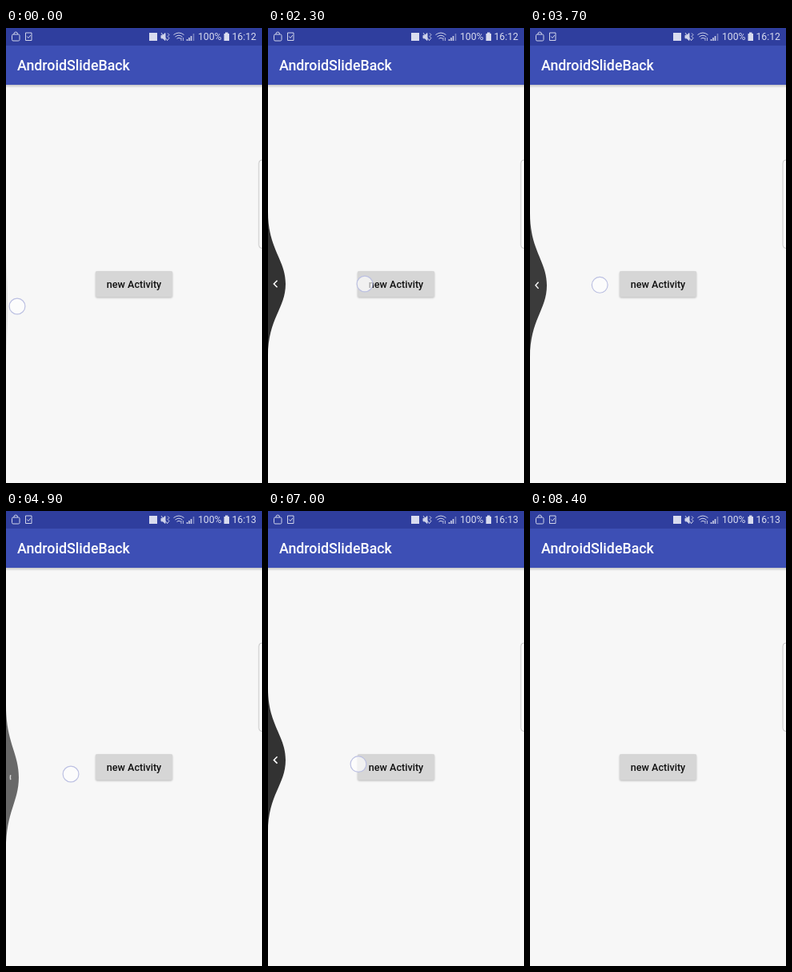
Write an HTML page that moves like this. It is 320x569 px and loops after 8500 ms.

```html
<!DOCTYPE html>
<html lang="en">
<head>
<meta charset="utf-8">
<title>Slide back</title>
<style>
  html, body { margin: 0; width: 100%; height: 100%; overflow: hidden; background: #f7f7f7; }
  svg { display: block; width: 100%; height: 100%; }
  text { font-family: Roboto, "Noto Sans", sans-serif; }
  .icon { fill: none; stroke: #d0d4ea; stroke-width: 1; }
  .status { fill: #d9dcef; font-size: 12.2px; }
</style>
</head>
<body>
<svg viewBox="0 0 320 569">
  <defs>
    <linearGradient id="shade" x2="0" y2="1">
      <stop offset="0" stop-color="#000" stop-opacity=".2"/>
      <stop offset="1" stop-color="#000" stop-opacity="0"/>
    </linearGradient>
    <filter id="soft" x="-10%" y="-20%" width="120%" height="150%">
      <feGaussianBlur stdDeviation="1"/>
    </filter>
  </defs>

  <rect width="320" height="569" fill="#f7f7f7"/>
  <rect y="71" width="320" height="4" fill="url(#shade)"/>
  <rect y="21" width="320" height="50" fill="#3d4fb5"/>
  <rect width="320" height="22" fill="#2f3e9e"/>
  <text x="14" y="53" font-size="17.8" font-weight="500" fill="#fff">AndroidSlideBack</text>

  <!-- status bar -->
  <g class="icon">
    <rect x="7.5" y="8" width="9.5" height="8" rx="1.5"/>
    <path d="M9.8 8q0-3 2.4-3t2.4 3"/>
    <path d="M24.5 6h7.5v9.5h-7.5zM26.3 10.5l1.7 2 2.8-3.5"/>
    <path d="M194 9.2h2l3-2.7v9l-3-2.7h-2z" fill="#d0d4ea"/>
    <path d="M194 6l8 10M202 6.5l2 2-2 2 2 2-2 2.5"/>
    <path d="M209.5 8.5q6.5-5 13 0M211.5 11q4.5-3.5 9 0M213.5 13.3q2.5-2 5 0"/>
    <path d="M219 12v4M221.5 12v4" stroke-width=".8"/>
    <path d="M226.5 14v2M229 12v4M231.5 10v6" stroke-width="1.6"/>
    <path d="M234.5 7v9" stroke-width="1.6" opacity=".45"/>
  </g>
  <rect x="179" y="6" width="10" height="10" fill="#d9dcef"/>
  <path d="M274 5.5h3.5V7h1.5v9h-6.5V7h1.5z" fill="#d9dcef"/>
  <text class="status" x="240" y="15.3">100%</text>
  <text class="status" id="clock" x="282.5" y="15.3">16:12</text>

  <rect x="316" y="165" width="14" height="110.5" rx="4" fill="#fafafa" stroke="#c6c6c6"/>

  <rect x="112" y="305" width="96" height="32.5" rx="2" opacity=".24" filter="url(#soft)"/>
  <rect x="112" y="304" width="96" height="32.5" rx="1.5" fill="#d6d6d6"/>
  <text x="160" y="325" font-size="12.6" font-weight="500" text-anchor="middle" fill="#111">new Activity</text>

  <g id="back">
    <path id="wave"/>
    <path id="arrow" fill="none" stroke="#fff" stroke-width="1.5"/>
  </g>
  <circle id="finger" r="9.9" fill="#fff" fill-opacity=".65" stroke="#bcc0e2" stroke-width="1.2"/>
</svg>
<script>
const LOOP = 8500, STEP = 100, LAG = 25, CLOCK_CHANGE = 4700;
const EDGE = { x: 14, y: 348 };
const MAX_WIDTH = 22, HALF_HEIGHT = 90;

// Every stroke swings out from the edge and back; hold flattens the turning point.
const strokes = [
  { start: 0, length: 1500, reach: 80, lift: 17 },
  { start: 1500, length: 1600, reach: 107, lift: 28 },
  { start: 3100, length: 1500, reach: 77, lift: 28 },
  { start: 4810, length: 290, reach: 81, lift: 23 },
  { start: 5500, length: 800, reach: 60, lift: 15 },
  { start: 6600, length: 1700, reach: 99, lift: 25, hold: 1.5, sway: 35 }
];

const el = id => document.getElementById(id);
const clamp = (v, lo, hi) => Math.min(hi, Math.max(lo, v));

function fingerAt({ start, length, reach, lift, hold = 1, sway = 0 }, t) {
  const p = clamp((t - start) / length, 0, 1);
  const swing = Math.min(1, hold * Math.sin(Math.PI * p));
  return {
    x: EDGE.x + reach * swing,
    y: EDGE.y - lift * swing - sway * Math.sin(4 * Math.PI * p)
  };
}

function drawBack({ x, y }) {
  const width = clamp((x - 5) * 0.26, 0, MAX_WIDTH);
  const rate = width / MAX_WIDTH;
  const foot = HALF_HEIGHT * 0.48, crest = HALF_HEIGHT * 0.34;
  el("wave").setAttribute("d",
    `M0 ${y - HALF_HEIGHT}C0 ${y - foot} ${width} ${y - crest} ${width} ${y}` +
    `C${width} ${y + crest} 0 ${y + foot} 0 ${y + HALF_HEIGHT}Z`);
  el("wave").setAttribute("fill-opacity", 0.795 * rate);

  const fold = clamp((rate - 0.7) / 0.3, 0, 1) * 4.2;
  const tip = width / 3, arm = 4.2 * rate;
  el("arrow").setAttribute("d", `M${tip + fold} ${y - arm}L${tip} ${y}L${tip + fold} ${y + arm}`);
  el("arrow").setAttribute("opacity", rate);
}

function render(time) {
  const t = Math.floor((time % LOOP) / STEP) * STEP;
  const stroke = strokes.find(s => t >= s.start && t < s.start + s.length);
  for (const id of ["back", "finger"]) el(id).style.display = stroke ? "" : "none";
  el("clock").textContent = t < CLOCK_CHANGE ? "16:12" : "16:13";
  if (!stroke) return;
  const { x, y } = fingerAt(stroke, t);
  el("finger").setAttribute("cx", x);
  el("finger").setAttribute("cy", y);
  drawBack(fingerAt(stroke, t - LAG));
}

const start = performance.now();
function tick() {
  render(performance.now() - start);
  requestAnimationFrame(tick);
}
tick();
</script>
</body>
</html>
```
